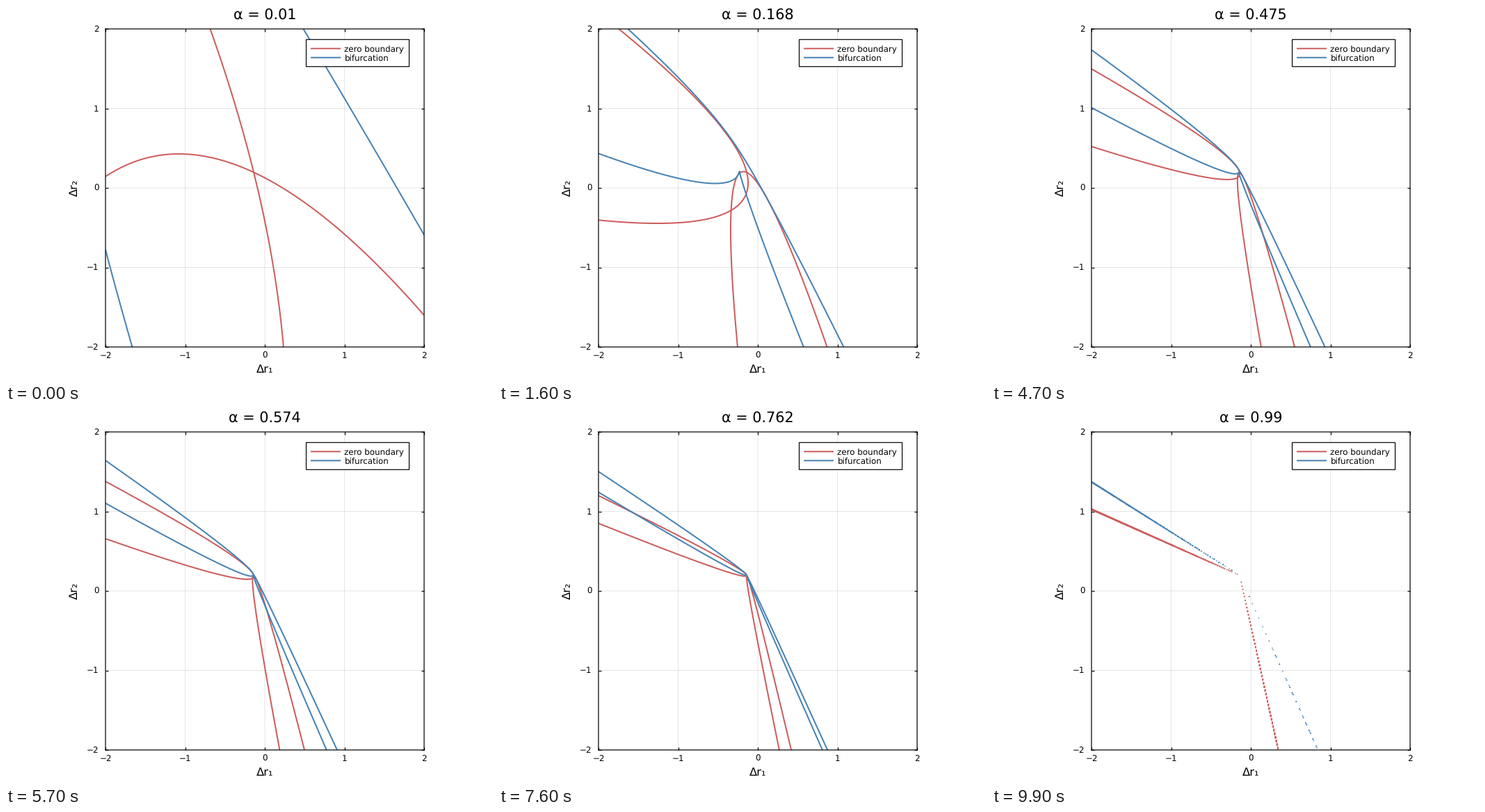
Animation of 700x540 px, one loop 10000 ms. Source, as a matplotlib script:

```python
import numpy as np
import matplotlib.pyplot as plt
from matplotlib.animation import FuncAnimation
from matplotlib.patches import Rectangle

W, H, DPI = 700, 540, 100
FRAMES, INTERVAL = 100, 100
PX = 72 / DPI
HAIR, CURVE = 1.2 * PX, 2 * PX
RED, BLUE = "indianred", "steelblue"
LEFT, RIGHT, TOP, BOTTOM = 143, 601, 33, 491
SMALL, MEDIUM, LARGE = 11.9, 16.35, 20.8

plt.rcParams.update({"font.family": "DejaVu Sans", "text.hinting": "none",
                     "path.simplify": False})

# Quadratic map r = a1 x + a2 y + k (b1 x^2 + c x y + b2 y^2), seen from APEX
APEX = (-0.1395, 0.1965)
A1 = np.array([-0.2475, 1.0])
A2 = np.array([1.0, -0.4670])
B1 = 3.585 * np.array([-1.0, 0.4462])
B2 = 23.12 * np.array([0.2206, -1.0])
C = np.array([-15.335, 16.949])

grid = np.linspace(-2, 2, 401)
gx, gy = np.meshgrid(grid, grid)
alphas = np.linspace(0.01, 0.99, FRAMES)


def cross(u, v):
    return u[0] * v[1] - u[1] * v[0]


def parabola(r, a, b):
    """Zero on the curve r = a s + b s^2."""
    s = cross(r, b) / cross(a, b)
    return cross(r, a) / cross(b, a) - s ** 2


def pencil(v):
    return np.poly1d([v[1], v[0]])


XX, XY, YY, X1, Y1 = map(pencil, (B1, C, B2, A1, A2))
MINOR = XX * YY - XY * XY * 0.25
REST = (XY * X1 * Y1 - XX * Y1 * Y1 - YY * X1 * X1) * 0.25


def fold(r):
    """Discriminant of the conic pencil: zero where two solutions merge."""
    u, v = r
    a = REST[3] - v * MINOR[2]
    b = REST[2] - u * MINOR[2] - v * MINOR[1]
    c = REST[1] - u * MINOR[1] - v * MINOR[0]
    d = REST[0] - u * MINOR[0]
    return (18 * a * b * c * d - 4 * b ** 3 * d + b ** 2 * c ** 2
            - 4 * a * c ** 3 - 27 * a ** 2 * d ** 2)


fig = plt.figure(figsize=(W / DPI, H / DPI), dpi=DPI, facecolor="white")
ax = fig.add_axes([LEFT / W, 1 - BOTTOM / H, (RIGHT - LEFT) / W, (BOTTOM - TOP) / H])
ax.set(xlim=(-2, 2), ylim=(-2, 2), xticks=range(-2, 3), yticks=range(-2, 3))
ax.set_axisbelow(True)
ax.grid(color="black", alpha=0.1, linewidth=PX, snap=False)
ax.tick_params(direction="in", top=True, right=True, length=4 * PX, width=HAIR,
               labelbottom=False, labelleft=False)
for spine in ax.spines.values():
    spine.set(linewidth=HAIR, snap=False)

# Overlay in pixel coordinates for text and legend
page = fig.add_axes([0, 0, 1, 1], zorder=5)
page.set(xlim=(0, W), ylim=(H, 0))
page.axis("off")


def label(x, y, text, size, ha="center", **kw):
    return page.text(x, y, text, fontsize=size * PX, ha=ha, va="baseline", **kw)


for n in range(-2, 3):
    name = str(n).replace("-", "\u2212")
    label(372 + 114.5 * n, 507, name, SMALL)
    label(133.5, 266 - 114.5 * n, name, SMALL, ha="right")
label(372, 528.5, "Δr₁", MEDIUM)
label(103, 262, "Δr₂", MEDIUM, rotation=90, rotation_mode="anchor")
title = label(372, 18.5, "", LARGE)

page.add_patch(Rectangle((431.5, 48.3), 148, 39, facecolor="white",
                         edgecolor="black", linewidth=HAIR, snap=False))
for y, color, name in ((61.3, RED, "zero boundary"), (74.3, BLUE, "bifurcation")):
    page.plot([438, 481], [y, y], color=color, linewidth=CURVE,
              solid_capstyle="butt", snap=False)
    label(486.5, y + 4.3, name, SMALL, ha="left")

curves = []


def update(i):
    while curves:
        curves.pop().remove()
    alpha = alphas[i]
    k = alpha / (1 - alpha) ** 2
    r = k * (gx - APEX[0]), k * (gy - APEX[1])
    fields = ((parabola(r, A1, B1), RED), (parabola(r, A2, B2), RED),
              (fold(r), BLUE))
    for z, color in fields:
        z = z / np.abs(z).max()
        cs = ax.contour(grid, grid, z, levels=[0], colors=[color],
                        linewidths=CURVE)
        cs.set(capstyle="round", joinstyle="round")
        curves.append(cs)
    title.set_text(f"α = {round(alpha, 3):g}")
    return []


anim = FuncAnimation(fig, update, frames=FRAMES, init_func=lambda: [],
                     interval=INTERVAL, repeat=True, repeat_delay=0, blit=False)
plt.show()
```
